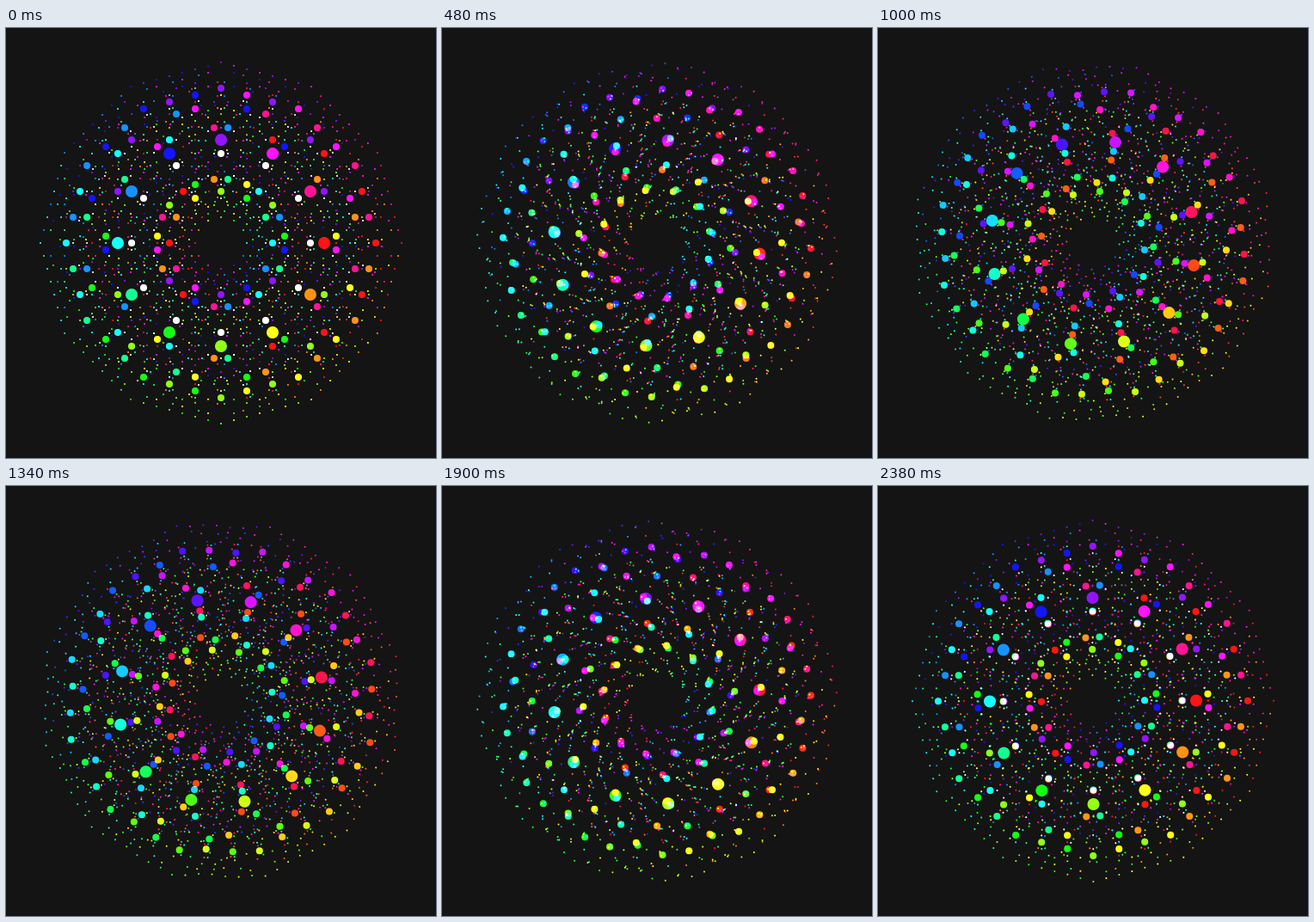
Animation, 500 px wide and 500 px high, one loop 2.4 s. Source, as an HTML page with a canvas:

```html
<!DOCTYPE html>
<html>
<head>
<meta charset="utf-8">
<style>
  html, body { margin: 0; overflow: hidden; background: #141414; }
  canvas { display: block; }
</style>
</head>
<body>
<canvas width="500" height="500"></canvas>
<script>
const ctx = document.querySelector('canvas').getContext('2d');
const LOOP = 2400, COUNT = 12, STEP = 360 / COUNT;

// Each dot carries a smaller ring that turns the opposite way.
const rings = [
  { radius: 120, dot: 7, turn: 1 },
  { radius: 60, dot: 4, turn: -1 },
  { radius: 30, dot: 1, turn: 1 },
];

function drawRing(cx, cy, level, t) {
  if (level === rings.length) return;
  const { radius, dot, turn } = rings[level];
  for (let i = 0; i < COUNT; i++) {
    const degrees = (i + turn * t) * STEP;
    const angle = degrees * Math.PI / 180;
    const x = cx + radius * Math.cos(angle);
    const y = cy + radius * Math.sin(angle);
    ctx.fillStyle = `hsl(${degrees}, 100%, 50%)`;
    ctx.beginPath();
    ctx.arc(x, y, dot, 0, 2 * Math.PI);
    ctx.fill();
    drawRing(x, y, level + 1, t);
  }
}

function frame() {
  ctx.globalCompositeOperation = 'source-over';
  ctx.fillStyle = '#141414';
  ctx.fillRect(0, 0, 500, 500);
  ctx.globalCompositeOperation = 'lighter';
  drawRing(250, 250, 0, performance.now() % LOOP / LOOP);
  requestAnimationFrame(frame);
}
frame();
</script>
</body>
</html>
```
